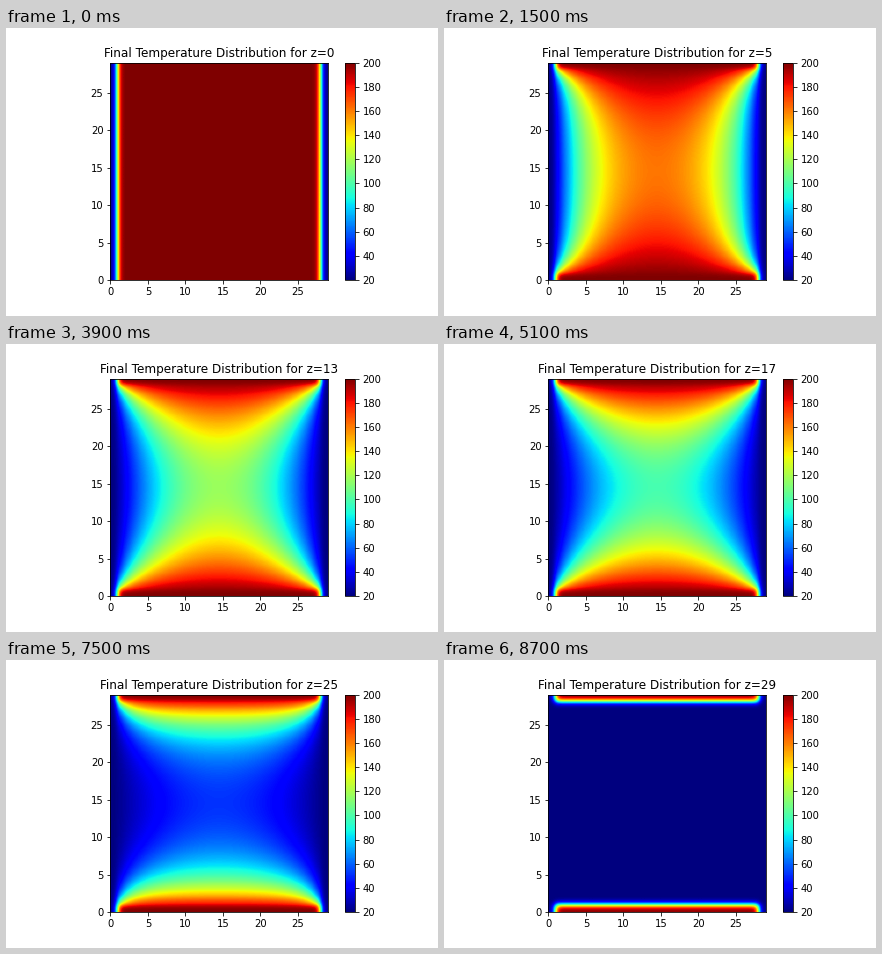
A matplotlib script that plays this animation: 432x288 px, repeating every 9000 ms.

```python
import numpy as np
import matplotlib.pyplot as plt
from matplotlib.animation import FuncAnimation

N = 30
COLD, HOT = 20, 200


def solve_steady_heat():
    """Steady temperature in a cube, indexed [z, y, x], with fixed faces."""
    temp = np.zeros((N, N, N))
    temp[0], temp[-1] = HOT, COLD
    temp[:, [0, -1], :] = HOT
    temp[:, :, [0, -1]] = COLD

    # The seven-point Laplacian is diagonal in the 1D eigenvectors.
    m = N - 2
    lap = 2 * np.eye(m) - np.eye(m, k=1) - np.eye(m, k=-1)
    lam, vec = np.linalg.eigh(lap)

    edge = sum(np.roll(temp, s, axis) for axis in range(3) for s in (1, -1))
    edge = edge[1:-1, 1:-1, 1:-1]

    def transform(a, basis):
        for axis in range(3):
            a = np.moveaxis(np.tensordot(basis, a, (1, axis)), 0, axis)
        return a

    coef = transform(edge_only(temp, edge), vec.T)
    coef /= lam[:, None, None] + lam[:, None] + lam
    temp[1:-1, 1:-1, 1:-1] = transform(coef, vec)
    return temp


def edge_only(temp, edge):
    """Neighbour sums come from the walls alone while the inside is zero."""
    assert not temp[1:-1, 1:-1, 1:-1].any()
    return edge


temp = solve_steady_heat()

fig, ax = plt.subplots(figsize=(6, 4), dpi=72, facecolor="white",
                       gridspec_kw={"bottom": 0.125, "top": 0.88,
                                    "left": 0.125, "right": 0.9})
image = ax.imshow(temp[0], cmap="jet", vmin=COLD, vmax=HOT, origin="lower",
                  extent=(0, N - 1, 0, N - 1), interpolation="gaussian")
ax.set_xticks(range(0, N, 5))
ax.set_yticks(range(0, N, 5))
title = ax.set_title("")
fig.colorbar(image, ax=ax, ticks=range(COLD, HOT + 1, 20))


def draw(z):
    image.set_data(temp[z])
    title.set_text(f"Final Temperature Distribution for z={z}")
    return image, title


anim = FuncAnimation(fig, draw, frames=N, interval=300, repeat=True,
                     repeat_delay=0, init_func=lambda: draw(0))
plt.show()
```
